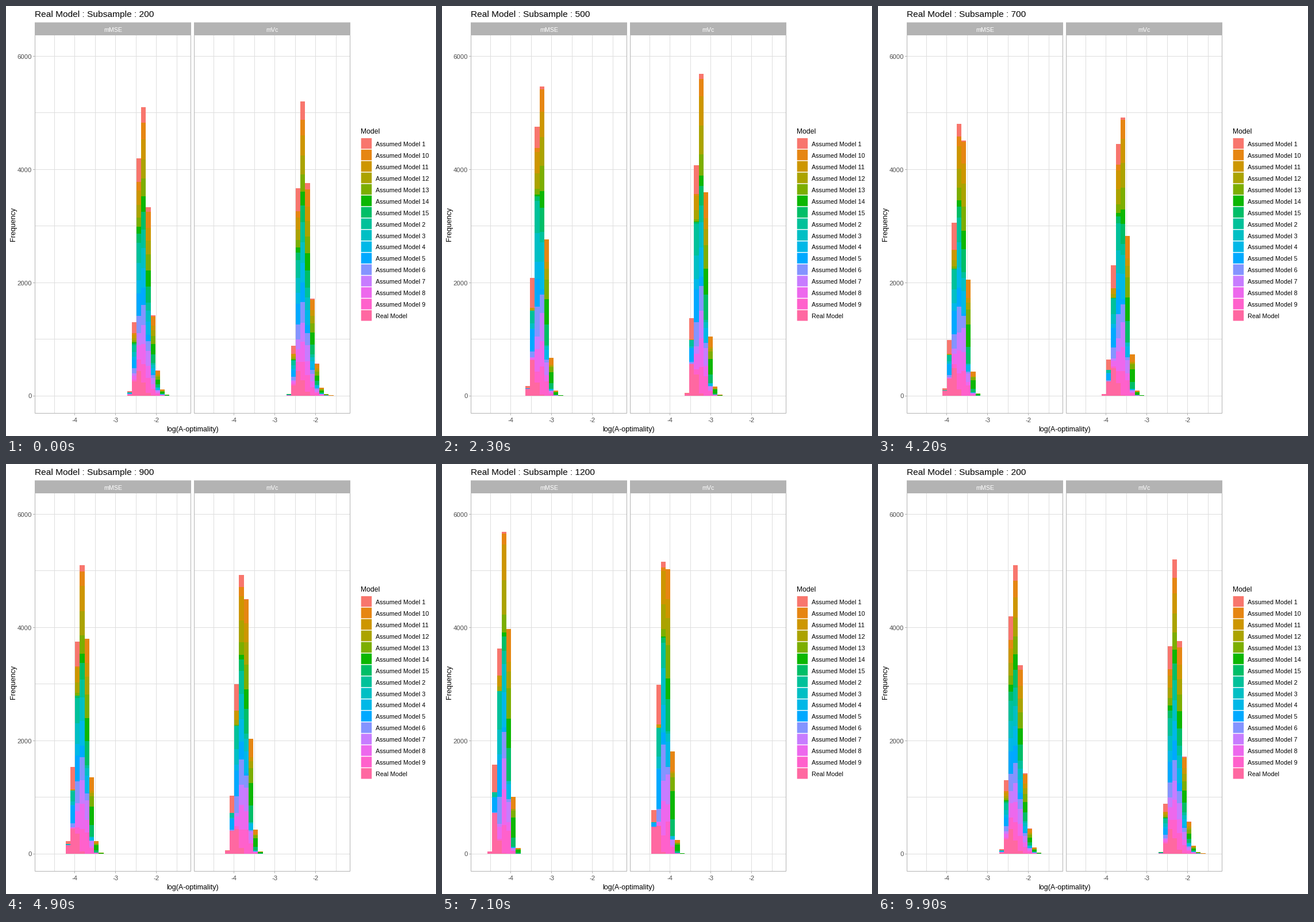
Write a matplotlib script that moves like this. It is 748 by 748 pixels and loops after 10000 ms.

```python
import math

import matplotlib.pyplot as plt
import numpy as np
from matplotlib.animation import FuncAnimation
from matplotlib.collections import PolyCollection
from matplotlib.patches import Rectangle

SIZE, DPI = 748, 88
FRAMES, STEP_MS = 100, 100

MODELS = [f"Assumed Model {i}" for i in
          sorted(range(1, 16), key=str)] + ["Real Model"]
# Distance of each model's mean from the overall mean, in bins
OFFSETS = np.array([-1.45, 1.05, 0, 0.27, 0.82, 1.4, 0.93, -0.82,
                    -0.38, 0.2, -1.17, -0.43, 0.4, -0.05, 0.5, -1.78])
OFFSETS -= OFFSETS.mean()

# Every state rests for five frames, then moves to the next in a few steps
SAMPLES = list(range(200, 1600, 100))
STEPS = [4] * 3 + [3] * 3 + [2] + [3] * 7
ARRIVE = np.cumsum(np.add(STEPS, 4)) - 1

BINS, RUNS, SKEW = 30, 1000, 0.15
PANEL_X, PANEL_W, PANEL_TOP, PANEL_BOTTOM = (50, 327), 271, 50, 708
BASE_Y, Y_SCALE = 678, 0.0985
BIN_X, BIN_W = 12.8, 8.21

normal_cdf = np.vectorize(lambda z: 0.5 * (1 + math.erf(z / math.sqrt(2))))


def hue_color(i, count, lum=65, chroma=100):
    """Evenly spaced hue on the polar LUV circle, as clipped sRGB."""
    hue = math.radians(15 + 360 * i / count)
    y = ((lum + 16) / 116) ** 3
    u = chroma * math.cos(hue) / (13 * lum) + 0.19784
    v = chroma * math.sin(hue) / (13 * lum) + 0.46834
    x = 9 * y * u / (4 * v)
    z = 3 * y / v - 5 * y - x / 3
    linear = (3.2405 * x - 1.5372 * y - 0.4985 * z,
              -0.9693 * x + 1.8760 * y + 0.0416 * z,
              0.0556 * x - 0.2040 * y + 1.0572 * z)
    return [min(1, 1.055 * c ** (1 / 2.4) - 0.055) if c > 0.00304
            else max(0, 12.92 * c) for c in linear]


COLORS = [hue_color(i, len(MODELS)) for i in range(len(MODELS))]


def histogram(n, panel):
    """Counts per model and bin from slightly skewed normal distributions."""
    lag = math.log(n / 500)
    mean = 13.185 - 8.98 * lag + 0.18 * lag ** 2
    mean += panel * (0.27 + 0.085 * lag)
    sd = (0.44 + 131 / n) * (1 + 0.12 * OFFSETS)
    mu = mean + OFFSETS * (1.09 - 104 / n) - sd * SKEW / 2
    u = (np.arange(BINS + 1) - mu[:, None]) / sd[:, None]
    z = np.log(np.maximum(1 + SKEW * u, 1e-9)) / SKEW
    return RUNS * np.diff(normal_cdf(z), axis=1)


STATES = [np.array([histogram(n, p) for p in (0, 1)]) for n in SAMPLES]


def progress(frame):
    """Current state, next state and the share of the way between them."""
    for i, (end, steps) in enumerate(zip(ARRIVE, STEPS)):
        if frame < end:
            return i, (i + 1) % len(SAMPLES), max(0, frame - end + steps) / steps
    return 0, 0, 0


def bars(counts):
    verts, fills = [], []
    for panel, left in zip(counts, PANEL_X):
        xs = np.round(left + BIN_X + BIN_W * np.arange(BINS + 1))
        # the last model lies at the bottom of each stack
        tops = np.cumsum(panel[::-1], axis=0)[::-1]
        tops = np.vstack([tops, np.zeros(BINS)])
        ys = np.round(BASE_Y - Y_SCALE * tops)
        for m, k in np.argwhere(ys[1:] > ys[:-1]):
            x0, x1, y0, y1 = xs[k], xs[k + 1], ys[m, k], ys[m + 1, k]
            verts.append([(x0, y0), (x1, y0), (x1, y1), (x0, y1)])
            fills.append(COLORS[m])
    return verts, fills


plt.rcParams["font.family"] = "Liberation Sans"
fig = plt.figure(figsize=(SIZE / DPI, SIZE / DPI), dpi=DPI, facecolor="white")
ax = fig.add_axes([0, 0, 1, 1])
ax.set_xlim(0, SIZE)
ax.set_ylim(SIZE, 0)
ax.axis("off")


def pt(px):
    return px * 72 / DPI


def label(x, y, s, px, color="black", ha="left", va="baseline", **kw):
    return ax.text(x, y, s, fontsize=pt(px), color=color, ha=ha, va=va, **kw)


def line(xs, ys, color, z):
    ax.plot(xs, ys, color=color, lw=pt(1), zorder=z, snap=False,
            solid_capstyle="butt")


def box(x, y, w, h, z=1, **kw):
    ax.add_patch(Rectangle((x, y), w, h, zorder=z, snap=False, **kw))


GRID, FRAME, TICK_TEXT = "#DEDEDE", "#B3B3B3", "#4D4D4D"


def grid_y(value):
    return math.floor(BASE_Y + 0.3 - Y_SCALE * value) + 0.5


for left, name in zip(PANEL_X, ("mMSE", "mVc")):
    right = left + PANEL_W
    for i in range(7):
        x = math.floor(left + 34 + 35.5 * i) + 0.5
        line([x, x], [PANEL_TOP, PANEL_BOTTOM], GRID, 1)
        y = grid_y(1000 * i)
        line([left, right], [y, y], GRID, 1)
    box(left + 0.5, PANEL_TOP + 0.5, PANEL_W, PANEL_BOTTOM - PANEL_TOP, 4,
        fill=False, ec=FRAME, lw=pt(1))
    box(left, 28.5, PANEL_W + 1, 21.5, fc=FRAME, lw=0)
    label(left + 136, 44.5, name, 10.6, "white", "center")
    for i, tick in enumerate(("-4", "-3", "-2")):
        x = left + 69.5 + 71 * i
        line([x, x], [709, 712], FRAME, 3)
        label(x, 724, tick, 11.2, TICK_TEXT, "center")

for tick in range(0, 6001, 2000):
    y = grid_y(tick)
    line([47, 50], [y, y], FRAME, 3)
    label(45, y + 4, tick, 11.2, TICK_TEXT, "right")

label(324.5, 740, "log(A-optimality)", 12.5, ha="center")
label(13, 379, "Frequency", 12.5, ha="center", va="center", rotation=90)

label(617, 222, "Model", 12.2)
for i, (name, color) in enumerate(zip(MODELS, COLORS)):
    y = 229.9 + 19.95 * i
    box(617.7, y, 18.5, 18.5, fc=color, lw=0)
    label(643, round(y) + 14, name, 10.8)

title = label(50, 19, "", 15.5)
stacks = PolyCollection([], linewidths=0, antialiaseds=False, zorder=2)
ax.add_collection(stacks, autolim=False)


def draw(frame):
    a, b, t = progress(frame)
    verts, fills = bars((1 - t) * STATES[a] + t * STATES[b])
    stacks.set_verts(verts)
    stacks.set_facecolor(fills)
    title.set_text(f"Real Model : Subsample : {SAMPLES[b if t >= 0.5 else a]}")
    return stacks, title


anim = FuncAnimation(fig, draw, frames=FRAMES, interval=STEP_MS, repeat=True)
plt.show()
```
